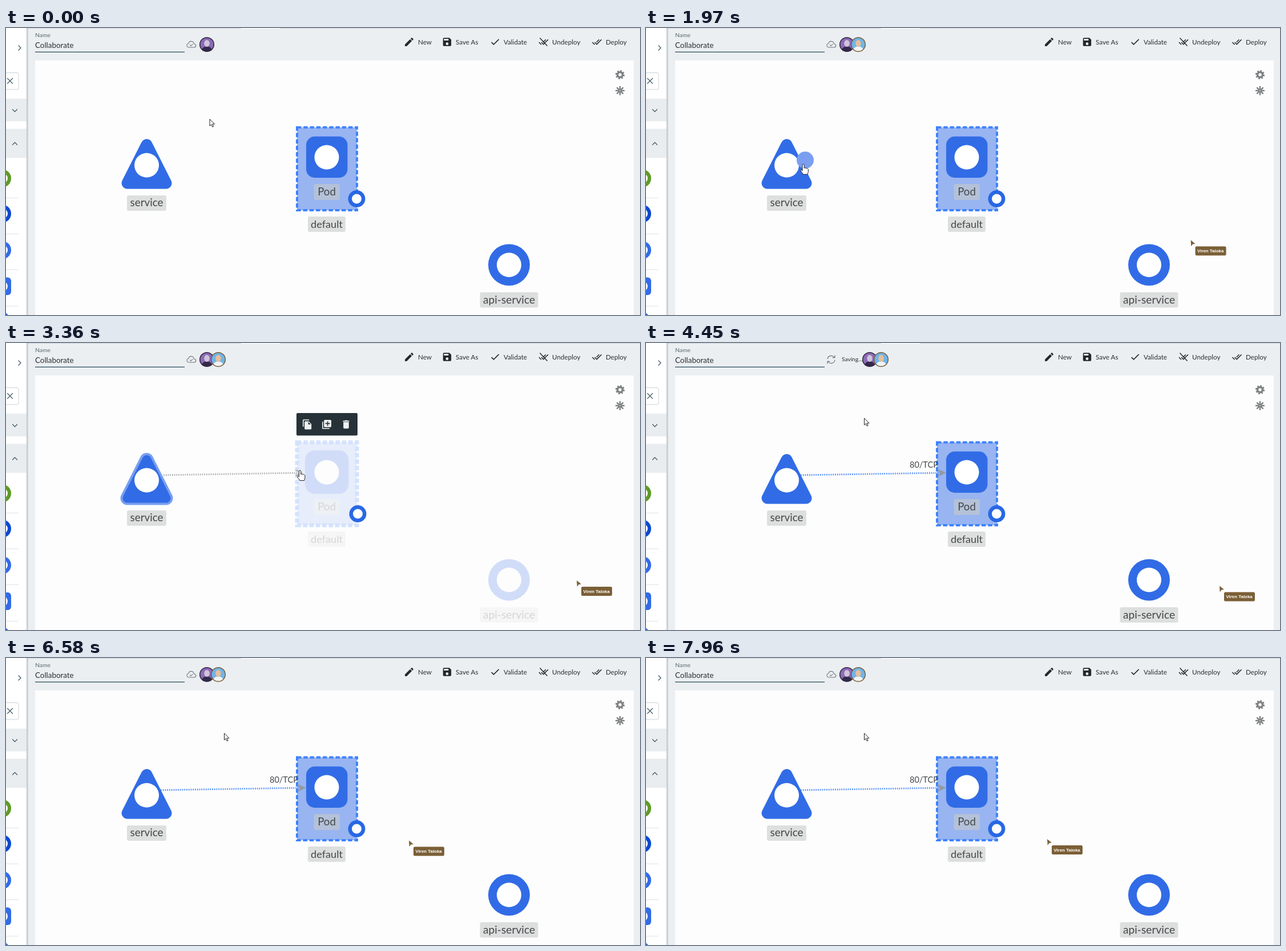
Write an HTML page that moves like this. It is 1111 px wide and 504 px high and loops after 7.99 s.

```html
<!DOCTYPE html>
<html lang="en">
<head>
<meta charset="utf-8">
<title>Collaborate</title>
<style>
html, body { margin: 0; width: 100%; height: 100%; overflow: hidden; background: #ebeff1; }
svg { display: block; width: 100%; height: 100%; }
text { font-family: Lato, sans-serif; fill: #2b2f31; }
.mid { text-anchor: middle; fill: #44484a; }
.tag { font: bold 7.9px "Liberation Sans", Arial, sans-serif; fill: #fff; }
.line { fill: none; stroke: #45606d; stroke-width: 1.4; stroke-linecap: round; stroke-linejoin: round; }
</style>
</head>
<body>
<svg viewBox="0 0 1111 504">
  <defs>
    <linearGradient id="shade">
      <stop offset="0" stop-color="#8e989e" stop-opacity=".55"/>
      <stop offset="1" stop-color="#8e989e" stop-opacity="0"/>
    </linearGradient>
  </defs>

  <rect width="1111" height="504" fill="#ebeff1"/>
  <path d="M0 .5H412M480 .5H1111" stroke="#cdd4d8"/>
  <path d="M412 .5H480" stroke="#fff"/>
  <rect x="51" y="57" width="1049" height="447" fill="#fdfdfe"/>

  <g id="side">
    <rect width="36" height="504" fill="#fff"/>
    <rect x="36" width="4" height="504" fill="url(#shade)"/>
    <path d="M0 124H36V164H0zM0 177H36V228H0z" fill="#e9edf0"/>
    <path d="M0 78.5H19a3 3 0 0 1 3 3V105a3 3 0 0 1-3 3H0" fill="none" stroke="#c9d1d6"/>
    <path class="line" d="M22 31l4 4-4 4M2.500 88.500l9 9m0-9l-9 9M11.500 143l4 4 4-4M11.500 205l4-4 4 4"/>
    <path d="M0 298.500H22M0 361.500H22M0 424.500H22M0 488.500H22" stroke="#dfe3e6"/>
  </g>

  <g id="head">
    <text x="51" y="16" font-size="10.4" style="fill:#5b6a72">Name</text>
    <text x="51" y="34.500" font-size="13.4">Collaborate</text>
    <path d="M51 42.300H313" stroke="#476572" stroke-width="1.5"/>
  </g>

  <g id="saved" transform="translate(316 20) scale(.72)" fill="none" stroke="#6b7378" stroke-width="1.500">
    <path d="M6 19.500a5 5 0 0 1-.4-9.900A6.500 6.500 0 0 1 18.400 11.100H19a4.200 4.200 0 0 1 0 8.400zM8.500 13.500l2.500 2.500 4.500-4.500"/>
  </g>
  <g id="saving">
    <g transform="translate(324.500 29)" fill="none" stroke="#6b7378" stroke-width="1.200">
      <path d="M-6.500 -1A6.600 6.600 0 0 1 5.300 -4M6.500 1A6.600 6.600 0 0 1 -5.300 4"/>
      <path d="M6.500 -7.500V-3.300H2.300M-6.500 7.500V3.300H-2.300"/>
    </g>
    <text x="343" y="32" font-size="10.200">Saving...</text>
  </g>
  <g id="users"></g>

  <g fill="none" stroke="#7f8283">
    <g transform="translate(1076 82)">
      <circle r="4.500" stroke-width="3.400"/>
      <circle r="6.800" stroke-width="2.600" stroke-dasharray="2.800 2.540"/>
    </g>
    <path id="star" stroke-width="2.500" stroke-linecap="round"/>
  </g>

  <g id="pod">
    <rect x="510" y="174.500" width="105" height="145.500" fill="#98b4f1"/>
    <rect id="frame" x="510" y="174.500" width="105" height="145.500" fill="none" stroke="#3f83fb" stroke-dasharray="7.500 3.750"/>
    <rect id="tile" x="526" y="190.500" width="72.500" height="72.500" rx="15" fill="#316ce6" stroke="#316ce6"/>
    <circle cx="562" cy="227" r="21.500" fill="#fff"/>
    <rect x="539.500" y="274" width="45.500" height="28" rx="3" fill="#b4c1d8"/>
    <text class="mid" x="562" y="294" font-size="18.600">Pod</text>
    <rect x="529" y="331" width="66" height="27" rx="3" fill="#dddfde"/>
    <text class="mid" x="562" y="351" font-size="18.200">default</text>
  </g>
  <g id="badge">
    <circle r="15" fill="#2868e4"/>
    <circle r="8.500" fill="#fff"/>
  </g>

  <g id="api">
    <circle cx="881.500" cy="416" r="36.500" fill="#316ce6"/>
    <circle cx="881.500" cy="416" r="21.500" fill="#fff"/>
    <rect x="830.500" y="464" width="102" height="27" rx="3" fill="#dddfde"/>
    <text class="mid" x="881.500" y="484" font-size="19.200">api-service</text>
  </g>

  <g id="service" stroke-linejoin="round">
    <path id="ring" d="M246.500 205L280.500 272.500H212.500z" fill="#7a9ff0" stroke="#7a9ff0" stroke-width="24"/>
    <path id="tri" d="M246.500 205L280.500 272.500H212.500z" fill="#316ce6" stroke="#316ce6"/>
    <circle cx="246.500" cy="241" r="21.500" fill="#fff"/>
    <rect x="212" y="294" width="69" height="27" rx="3" fill="#dddfde"/>
    <text class="mid" x="246.500" y="313" font-size="18.800">service</text>
  </g>
  <circle id="handle" cx="279" cy="232" r="15" fill="#7a9ff0"/>

  <g id="drag" fill="none" stroke="#b3b5b6">
    <path id="wire" stroke-width="3" stroke-dasharray="1.875"/>
    <path id="tip" d="M-10 -5L0 0L-10 5" stroke-width="2.500"/>
  </g>
  <g id="edge" fill="none">
    <path d="M271 232L514 228" stroke="#5f96f6" stroke-width="3" stroke-dasharray="1.875"/>
    <path d="M510 221L526 227.800L511 235L515 228z" fill="#929aa0"/>
    <text x="462" y="218.500" font-size="14.500" style="fill:#44484a">80/TCP</text>
  </g>

  <g id="bar">
    <rect x="509" y="123" width="107" height="39.500" rx="2" fill="#263238"/>
  </g>

  <g id="guest">
    <path d="M0 0L8 6.500L3.500 7L.8 11z" fill="#7b5f36"/>
    <rect x="8" y="11" width="54" height="16" rx="2.500" fill="#7b5f36"/>
    <text class="tag" x="11.500" y="21.500">Viren Taloka</text>
  </g>

  <g id="me" fill="#fff" stroke="#222" stroke-width="1" stroke-linejoin="round">
    <path id="arrow" d="M0 0V12L2.800 9.500L4.700 13.800L6.600 13L4.700 8.800H8.500z"/>
    <path id="hand" d="M-2 1.800a1.600 1.600 0 0 1 3.200 0V7c3-.6 7 .6 7.200 2.500v3.500c0 2-1.200 3-1.200 5H-.8c-.5-2.200-3.200-4-4.200-6.800-.5-1.700 1.200-2.200 3 .4z"/>
  </g>
</svg>

<script>
const LOOP = 7990;
const $ = id => document.getElementById(id);
const add = (id, html) => $(id).insertAdjacentHTML('beforeend', html);

const shapes = {
  pen: 'M3 17.25V21h3.75L17.81 9.94l-3.75-3.75zM20.71 7.04a1 1 0 0 0 0-1.41l-2.34-2.34a1 1 0 0 0-1.41 0l-1.83 1.83 3.75 3.75z',
  disk: 'M17 3H5a2 2 0 0 0-2 2v14a2 2 0 0 0 2 2h14a2 2 0 0 0 2-2V7zm-5 16a3 3 0 1 1 0-6 3 3 0 0 1 0 6zm3-10H5V5h10z',
  check: 'M9 16.17L4.83 12l-1.42 1.41L9 19 21 7l-1.41-1.41z',
  checks: 'M18 7l-1.41-1.41-6.34 6.34 1.41 1.41zm4.24-1.41L11.66 16.17 7.48 12l-1.41 1.41L11.66 19l12-12zM.41 13.41L6 19l1.41-1.41L1.83 12z',
  copy: 'M16 1H4a2 2 0 0 0-2 2v14h2V3h12zm-1 4l6 6v10a2 2 0 0 1-2 2H8a2 2 0 0 1-2-2V7a2 2 0 0 1 2-2zm-1 7h5.500L14 6.500z',
  plus: 'M4 6H2v14a2 2 0 0 0 2 2h14v-2H4zm16-4H8a2 2 0 0 0-2 2v12a2 2 0 0 0 2 2h12a2 2 0 0 0 2-2V4a2 2 0 0 0-2-2zm-1 9h-4v4h-2v-4H9V9h4V5h2v4h4z',
  bin: 'M6 19a2 2 0 0 0 2 2h8a2 2 0 0 0 2-2V7H6zM19 4h-3.500l-1-1h-5l-1 1H5v2h14z'
};
const icon = (name, x, y, k, fill) =>
  `<path d="${shapes[name]}" fill="${fill}" transform="translate(${x} ${y}) scale(${k}) translate(-12 -12)"/>`;

// Header actions: icon, icon centre, scale, label, label start
[['pen', 706.5, .82, 'New', 722], ['disk', 773, .8, 'Save As', 788],
 ['check', 857, .8, 'Validate', 872], ['checks', 942, .74, 'Undeploy', 957],
 ['checks', 1035.5, .74, 'Deploy', 1051]].forEach(([name, x, k, label, tx]) =>
  add('head', icon(name, x, 24.5, k, '#22282b') + `<text x="${tx}" y="28.500" font-size="11.700">${label}</text>`));
add('head', '<path d="M935.500 17.500L948.500 31.500" stroke="#22282b" stroke-width="1.500"/>');

['copy', 'plus', 'bin'].forEach((name, i) => add('bar', icon(name, 528 + i * 34, 143, .8, '#eef1f2')));

// Palette items cut off by the left border
[['#5f9a26', 264], ['#0b49cf', 326], ['#316ce6', 390], ['#316ce6', 453.5]].forEach(([fill, y], i) =>
  add('side', `<rect x="-21" y="${y - 15.5}" width="30" height="31" rx="${i < 3 ? 15.5 : 6}" fill="${fill}"/>
    <circle cx="-6" cy="${y}" r="9" fill="#fff"/>`));
add('side', '<circle cx="-6" cy="511" r="12" fill="#316ce6"/>');

const avatar = (id, x, ring, back, head, body) => add('users', `<g id="${id}" transform="translate(${x} 29)">
  <circle r="12.300" fill="${back}"/>
  <path d="M-8.500 8.500Q-7 3.500 0 3.500T8.500 8.500A12 12 0 0 1 -8.500 8.500z" fill="${body}"/>
  <ellipse cy="-2" rx="4.800" ry="6" fill="${head}"/>
  <circle r="12.300" fill="none" stroke="${ring}" stroke-width="1.500"/></g>`);
avatar('host', 352, '#2f2440', '#8b6bb5', '#cfc3dc', '#33284a');
avatar('peer', 372, '#7b5f36', '#6fb5ea', '#e8bf98', '#f1f3f5');

let rays = '';
for (let i = 0; i < 8; i++) {
  const a = i * Math.PI / 4, c = Math.cos(a), s = Math.sin(a);
  rays += `M${1076 + 2 * c} ${110 + 2 * s}L${1076 + 7 * c} ${110 + 7 * s}`;
}
$('star').setAttribute('d', rays);

// Pointer paths as [time, x, y]
const mePath = [[0, 357, 160], [970, 357, 160], [1760, 276, 239], [2150, 276, 239],
  [3050, 515.5, 223.5], [3520, 515.5, 223.5], [4150, 382.5, 132]];
const guestPath = [[0, 770, 350], [970, 770, 350], [1760, 950, 371], [1970, 954.5, 372.5],
  [2580, 999, 414], [3360, 1000, 417], [3410, 1004, 422], [3750, 1025, 430], [4220, 1008, 428],
  [4450, 1005, 426.5], [5060, 986, 429], [5120, 982, 431], [5650, 875.5, 428], [5890, 850, 402],
  [6580, 706, 320.5], [6670, 707, 319], [7150, 747, 298], [7510, 747, 306], [7960, 703, 318]];

function along(path, t, ease) {
  const n = path.findIndex(p => p[0] > t);
  if (n < 0) return path[path.length - 1].slice(1);
  const [a, b] = [path[n - 1], path[n]];
  let u = (t - a[0]) / (b[0] - a[0]);
  if (ease) u = u * u * (3 - 2 * u);
  return [a[1] + (b[1] - a[1]) * u, a[2] + (b[2] - a[2]) * u];
}
const show = (id, on) => $(id).setAttribute('display', on ? 'inline' : 'none');
const move = (id, x, y) => $(id).setAttribute('transform', `translate(${x.toFixed(2)} ${y.toFixed(2)})`);

function draw(t) {
  const joined = t >= 500, dragging = t >= 2150 && t < 3520;
  const saving = t >= 3700 && t < 4800, hand = t >= 1820 && t < 3700;
  const [mx, my] = along(mePath, t, true);

  move('me', mx, my);
  show('hand', hand);
  show('arrow', !hand);
  move('guest', ...along(guestPath, t));
  show('guest', joined);
  show('peer', joined);
  move('host', saving ? 392 : 352, 29);
  move('peer', saving ? 412 : 372, 29);
  show('saving', saving);
  show('saved', !saving);

  show('handle', t >= 1820 && t < 2150);
  show('ring', dragging);
  $('tri').setAttribute('stroke-width', dragging ? 16 : 20);
  for (const id of ['pod', 'api']) $(id).setAttribute('opacity', dragging ? .21 : 1);
  $('frame').setAttribute('stroke-width', dragging ? 7 : 4);
  $('tile').setAttribute('stroke-width', dragging ? 4 : 0);
  move('badge', dragging ? 616.5 : 614.5, 300);

  const ex = mx + 2, ey = my + 4.5;
  show('drag', dragging && mx > 284);
  $('wire').setAttribute('d', `M276 232L${ex - 5} ${ey}`);
  move('tip', ex, ey);
  show('edge', t >= 3520);
  show('bar', t >= 3000 && t < 3800);
}

const start = performance.now();
function tick() {
  draw((performance.now() - start) % LOOP);
  requestAnimationFrame(tick);
}
tick();
</script>
</body>
</html>
```
